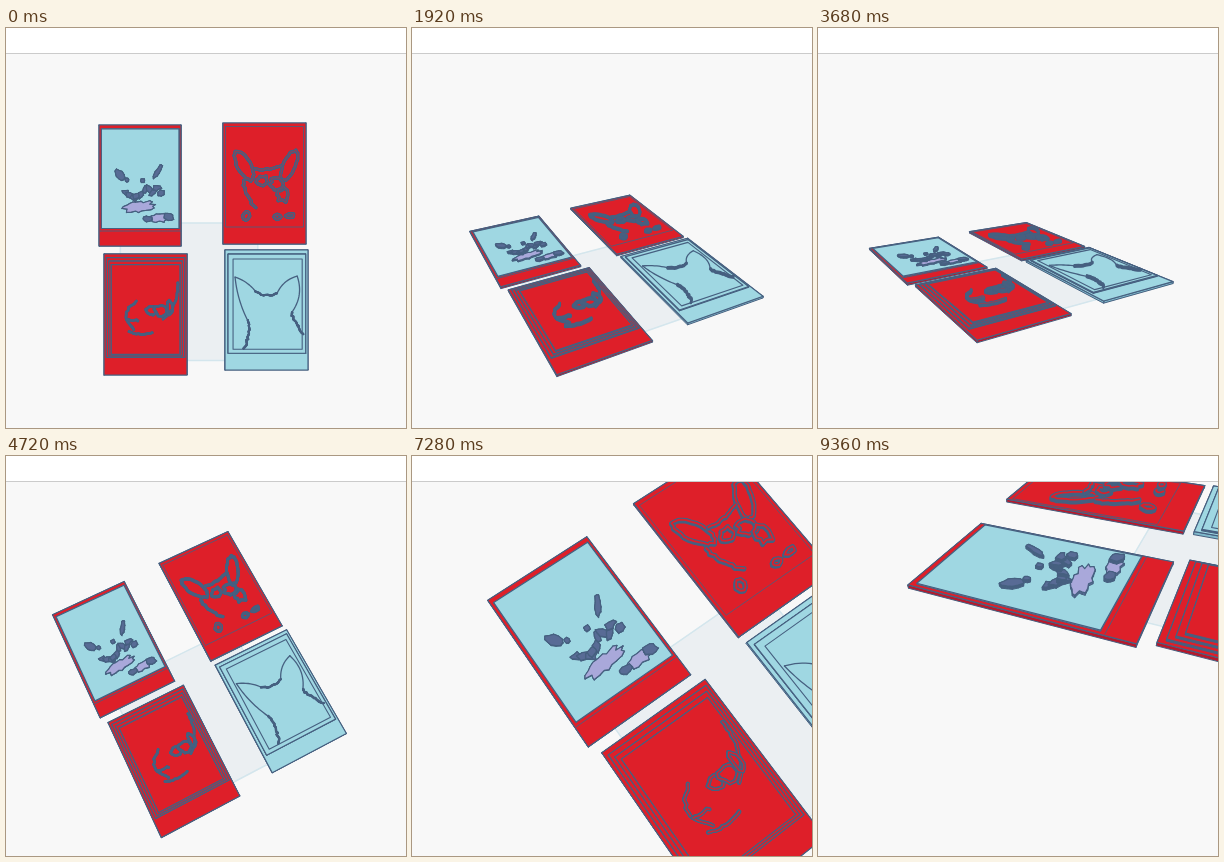
Write an HTML page with a canvas that moves like this. It is 400 px wide and 400 px high and loops after 9440 ms.

```html
<!DOCTYPE html>
<html lang="en">
<head>
<meta charset="utf-8">
<title>Layered cards on a workplane</title>
<style>
  html, body { margin: 0; width: 100%; height: 100%; overflow: hidden; background: #f8f8f8; }
  canvas { display: block; width: 400px; height: 400px; }
</style>
</head>
<body>
<canvas id="stage" width="400" height="400"></canvas>
<script>
const ctx = document.getElementById('stage').getContext('2d');
const LOOP = 9440, STEP = 80;
const FOCAL = 500, PIVOT_HEIGHT = 25, BASE = -2;
const INK = '#466080', RED = '#de1f29', RED_SIDE = '#b5192c';
const BLUE = '#9fd7e2', BLUE_SIDE = '#7fb9cb', DARK = '#586b95', LILAC = '#a9a8da';

// Orbit moves; a field that is left out keeps its last value
const moves = [
  { at: 0, yaw: 0, pitch: 0, reach: 475, x: 200, y: 212 },
  { at: 960, yaw: 20, pitch: 10, x: 206.5, y: 226 },
  { at: 1920, yaw: 27.2, pitch: 60 },
  { at: 3680, yaw: 31.6, pitch: 73 },
  { at: 4720, yaw: 27, pitch: 14 },
  { at: 5400, yaw: 31, pitch: 5 },
  { at: 6080, yaw: 35.1, pitch: 12.5 },
  { at: 6640 },
  { at: 7280, reach: 300, x: 132, y: 189 },
  { at: 7800, reach: 220, x: 85 },
  { at: 9360, yaw: 65.5, pitch: 49.5, reach: 153, x: 29.5 }
];
for (let i = 1; i < moves.length; i++) moves[i] = { ...moves[i - 1], ...moves[i] };

let camera;

function setCamera(t) {
  const next = moves.findIndex(m => m.at > t);
  const to = moves[next < 0 ? moves.length - 1 : next];
  const from = next < 0 ? to : moves[next - 1];
  const u = next < 0 ? 0 : (t - from.at) / (to.at - from.at);
  const mix = key => from[key] + (to[key] - from[key]) * u;
  const yaw = mix('yaw') * Math.PI / 180, pitch = mix('pitch') * Math.PI / 180;
  camera = {
    x: mix('x'), y: mix('y'), dist: mix('reach') + 24 * Math.sin(pitch),
    cy: Math.cos(yaw), sy: Math.sin(yaw), cp: Math.cos(pitch), sp: Math.sin(pitch)
  };
}

function project([x, y], h) {
  const c = camera, dx = x - c.x, dy = y - c.y, dz = h - PIVOT_HEIGHT;
  const rx = dx * c.cy + dy * c.sy;
  const ry = dy * c.cy - dx * c.sy;
  const scale = FOCAL / (c.dist - ry * c.sp - dz * c.cp);
  return [200 + scale * rx, 212 + scale * (ry * c.cp - dz * c.sp), scale];
}

// ---- Shapes on the plane ----

const rect = (x0, y0, x1, y1) => [[x0, y0], [x1, y0], [x1, y1], [x0, y1]];

function noise(n) {
  const v = Math.sin(n * 127.1 + 3.7) * 43758.5453;
  return v - Math.floor(v) - 0.5;
}

// Bent line from a to b with a torn edge
function strand(ax, ay, bx, by, bend = 0, rough = 0) {
  const length = Math.hypot(bx - ax, by - ay), parts = Math.ceil(length / 2.5);
  return Array.from({ length: parts + 1 }, (_, i) => {
    const u = i / parts, side = bend * 4 * u * (1 - u) / length, seed = ax + ay * 7 + i;
    return [ax + (bx - ax) * u - (by - ay) * side + rough * noise(seed),
            ay + (by - ay) * u + (bx - ax) * side + rough * noise(seed + 51)];
  });
}

// Torn ellipse
function blob(cx, cy, rx, ry, tilt = 0, rough = 0.5) {
  const parts = Math.max(8, Math.round((rx + ry) * 1.2)), a = tilt * Math.PI / 180;
  return Array.from({ length: parts }, (_, i) => {
    const w = i / parts * 2 * Math.PI, r = 1 + rough * noise(cx + cy * 3 + i);
    const x = rx * r * Math.cos(w), y = ry * r * Math.sin(w);
    return [cx + x * Math.cos(a) - y * Math.sin(a), cy + x * Math.sin(a) + y * Math.cos(a)];
  });
}

function ring(...args) {
  const points = blob(...args);
  return [...points, points[0]];
}

// ---- Drawing ----

function trace(points) {
  ctx.beginPath();
  points.forEach(([x, y]) => ctx.lineTo(x, y));
}

function polygon(points, fill, stroke = INK, width = 1.2) {
  trace(points);
  ctx.closePath();
  ctx.fillStyle = fill;
  ctx.fill();
  ctx.strokeStyle = stroke;
  ctx.lineWidth = width;
  ctx.stroke();
}

function slab(points, h0, h1, fill, side) {
  const low = points.map(p => project(p, h0));
  const high = points.map(p => project(p, h1));
  low.forEach((p, i) => {
    const j = (i + 1) % low.length;
    polygon([p, low[j], high[j], high[i]], side, INK, 1);
  });
  polygon(high, fill);
}

function line(points, h, width) {
  trace(points.map(p => project(p, h)));
  ctx.strokeStyle = INK;
  ctx.lineWidth = width;
  ctx.stroke();
}

const outline = (points, h, width) => line([...points, points[0]], h, width);

// Thin raised wall: dark sides, coloured crest once it is wide enough
function wall(points, h, width, fill) {
  const scaled = width * project(points[0], h)[2];
  for (let k = 0; k <= 2; k += 0.5) line(points, h + k, scaled);
  if (scaled > 2.8) {
    ctx.strokeStyle = fill;
    ctx.lineWidth = scaled - 2.4;
    ctx.stroke();
  }
}

// ---- Cards ----

const portrait = [
  ring(238, 138, 16, 6.5, 61, 0.15), ring(283, 138, 16, 6, 113, 0.15),
  strand(249, 141, 275, 138, 2, 1.5), strand(237, 153, 249, 179, 2, 2),
  ring(256, 153, 6, 5), ring(271, 156, 7, 6), ring(277, 167, 6, 7),
  ring(240, 188, 3, 4), ring(271, 189, 4, 2.2), ring(284, 188, 4, 2.2)
];

const shading = [
  strand(131, 273, 129, 301, 9, 1.5), strand(121, 291, 133, 292, 0, 1.5),
  strand(124, 303, 147, 304, 2, 1), strand(172, 254, 157, 291, -5, 1.5),
  ring(145, 282, 5, 4), ring(155, 282, 6, 5), ring(164, 279, 3, 6)
];

const contours = [
  strand(241, 291, 229, 249, -2), strand(229, 249, 250, 264, -2),
  strand(271, 265, 291, 248, -3), strand(291, 248, 285, 285, -5)
];
const tufts = [
  strand(238, 320, 241, 291, 3, 2.5), strand(250, 264, 271, 265, 2.5, 2),
  strand(285, 285, 296, 307, 0, 2.5)
];

const shards = [
  blob(114, 147, 5.5, 3.5, 50), blob(121, 152, 1.8, 2), blob(137, 153, 2, 2.2),
  blob(152, 144, 7.5, 2, -62), blob(142, 191, 5, 3), blob(163, 189, 5, 4)
];
for (let i = 0; i < 10; i++) {
  shards.push(blob(120 + i * 3.9, 168 - i * 0.4 + 10 * noise(i), 4.2, 2.4, 360 * noise(i + 20), 0.8));
}
const lilacs = [blob(133, 179, 14, 5, -8), blob(153, 190, 10, 4)];

function portraitCard() {
  slab(rect(217, 95, 300, 216), BASE, 0, RED, RED_SIDE);
  outline(rect(219.5, 98.5, 297.5, 199), 0, 0.8);
  portrait.forEach(s => wall(s, 0, 2.9, RED));
}

function shardCard() {
  slab(rect(93, 97, 175, 218), BASE, 0, RED, RED_SIDE);
  line(strand(94, 203, 175, 203), 0, 0.9);
  slab(rect(95.5, 101, 173, 200.5), 0, 0.6, BLUE, BLUE_SIDE);
  lilacs.forEach(s => slab(s, 0.6, 2, LILAC, DARK));
  shards.forEach(s => slab(s, 0.6, 2.4, DARK, INK));
}

function contourCard() {
  slab(rect(219, 222, 302, 342), BASE, 0, BLUE, BLUE_SIDE);
  slab(rect(222, 226, 299.5, 325), 0, 1, BLUE, INK);
  outline(rect(227, 231, 296, 321), 1, 1.1);
  contours.forEach(s => line(s, 1, 1.3));
  tufts.forEach(s => wall(s, 0, 2, BLUE));
}

function shadingCard() {
  slab(rect(98, 226, 181, 347), BASE, 0, RED, RED_SIDE);
  for (let i = 1; i <= 3; i++) {
    slab(rect(98 + 2.6 * i, 226 + 3.5 * i, 181 - 2.3 * i, 331 - 1.8 * i), i - 1, i, RED, INK);
  }
  shading.forEach(s => wall(s, 3, 2.3, RED));
}

function draw(elapsed) {
  setCamera(Math.floor(elapsed % LOOP / STEP) * STEP);
  ctx.lineJoin = ctx.lineCap = 'round';
  ctx.fillStyle = '#f8f8f8';
  ctx.fillRect(0, 0, 400, 400);

  polygon(rect(114, 195, 252, 333).map(p => project(p, BASE)), '#ebeff2', '#d4e6ed', 1.5);
  portraitCard();
  shardCard();
  contourCard();
  shadingCard();

  ctx.fillStyle = '#fff';
  ctx.fillRect(0, 0, 400, 25);
  ctx.fillStyle = '#cbcbcb';
  ctx.fillRect(0, 25, 400, 1);
}

const start = performance.now();
function tick() {
  draw(performance.now() - start);
  requestAnimationFrame(tick);
}
tick();
</script>
</body>
</html>
```
